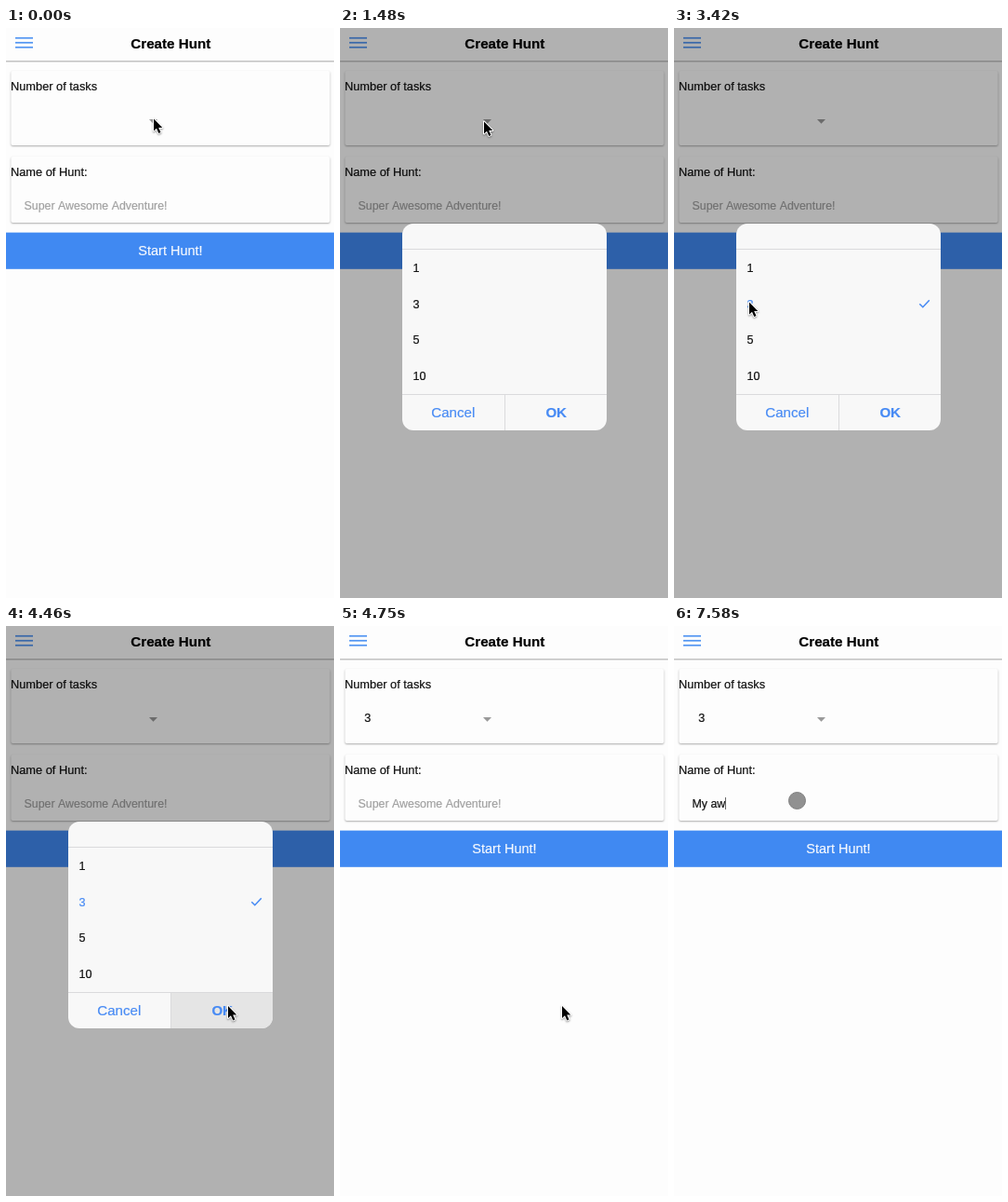
Write an HTML page with a canvas that moves like this. It is 353 by 612 pixels and loops after 8 s.

```html
<!DOCTYPE html>
<html lang="en">
<head>
<meta charset="utf-8">
<title>Create Hunt</title>
<style>
  html, body { margin: 0; width: 100%; height: 100%; overflow: hidden; background: #fdfdfd; }
  canvas { display: block; width: 353px; height: 612px; }
</style>
</head>
<body>
<canvas id="stage" width="353" height="612"></canvas>
<script>
const W = 353, H = 612, LOOP = 8000;
const STEP = 148.4; // the screen refreshes once per step
const stage = document.getElementById('stage').getContext('2d');
const layer = Object.assign(document.createElement('canvas'), { width: W, height: H });
const sheet = layer.getContext('2d');

const PAGE = '#fdfdfd', INK = '#111', BLUE = '#4089f2', LINK = '#488bf4', RULE = '#dadadc';

// All moments below are counted in steps.
const OPEN = { start: 8.85, length: 1 };
const CLOSE = { start: 30.23, length: 1.3 };
const PICK = 23, PRESS = 30, FOCUS = 39, BLINK = 42, TYPE = 44, TOUCH = 45;
const ENTRY = 'My aw', KEYS_PER_STEP = 3 / 5;

const MOVES = [
  { start: 0, length: 1, x: 155, y: 101 },
  { start: 11, length: 6, x: 81, y: 295 },
  { start: 24, length: 5, x: 239, y: 408.5 },
  { start: 33, length: 3, x: 132.3, y: 187.3 }
];

const mix = (a, b, p) => a + (b - a) * p;
const ease = x => {
  x = Math.min(1, Math.max(0, x));
  return x * x * (3 - 2 * x);
};
const progress = (span, k) => ease((k - span.start) / span.length);

function text(c, str, x, y, size, color, align = 'left', weight = 'normal') {
  c.font = `${weight} ${size}px "Liberation Sans", Arial, sans-serif`;
  c.textAlign = align;
  c.fillStyle = c.strokeStyle = color;
  c.fillText(str, x, y);
  c.lineWidth = 0.2;
  c.strokeText(str, x, y);
}

function rect(c, x, y, w, h, color) {
  c.fillStyle = color;
  c.fillRect(x, y, w, h);
}

function path(c, points) {
  c.beginPath();
  points.forEach(([x, y]) => c.lineTo(x, y));
}

function roundRect(c, x, y, w, h, r) {
  c.beginPath();
  c.roundRect(x, y, w, h, r);
}

function card(c, y, h) {
  c.save();
  c.shadowColor = 'rgba(0,0,0,.32)';
  c.shadowBlur = 2;
  c.shadowOffsetY = 1;
  c.fillStyle = PAGE;
  roundRect(c, 5.3, y, 343.4, h, 2);
  c.fill();
  c.restore();
}

function header(c) {
  rect(c, 0, 35, W, 1.5, '#c2c2c2');
  for (let i = 0; i < 3; i++) rect(c, 10, 9.9 + i * 5, 19, 1.7, '#5094f2');
  text(c, 'Create Hunt', 177.3, 22, 15.2, '#000', 'center', 'bold');
}

function nameField(c, k) {
  const count = k < TYPE ? 0 : 1 + Math.floor((k - TYPE) * KEYS_PER_STEP);
  const value = ENTRY.slice(0, count);
  text(c, value || 'Super Awesome Adventure!', 19.5, 195, 12.4, value ? INK : '#a0a0a0');
  if (value || (k >= FOCUS && k < BLINK)) {
    const x = value ? 19.5 + c.measureText(value).width : 19.5;
    rect(c, Math.round(x), 184, 1, 13, '#666');
  }
}

function form(c, k) {
  rect(c, 0, 0, W, H, PAGE);
  header(c);
  card(c, 46, 80);
  text(c, 'Number of tasks', 5, 67.1, 12.8, INK);
  if (k > PRESS) text(c, '3', 26.3, 103.2, 12.6, INK);
  path(c, [[154, 98], [163, 98], [158.5, 102.8]]);
  c.fillStyle = '#999';
  c.fill();
  card(c, 138, 71);
  text(c, 'Name of Hunt:', 5, 159.1, 12.8, INK);
  nameField(c, k);
  rect(c, 0, 219.6, W, 39.2, BLUE);
  text(c, 'Start Hunt!', 177, 244.1, 14.5, '#f4f8fe', 'center');
}

function dialog(c, scale, k) {
  c.clearRect(0, 0, W, H);
  c.save();
  c.translate(177, 321);
  c.scale(scale, scale);
  c.translate(-177, -321);
  roundRect(c, 67, 210, 220, 222, 12);
  c.clip();
  rect(c, 67, 210, 220, 222, '#f8f8f8');
  if (k >= PRESS) rect(c, 178, 394, 109, 38, '#e5e5e5');
  rect(c, 67, 237, 220, 1, RULE);
  rect(c, 67, 393, 220, 1, RULE);
  rect(c, 177, 394, 1, 38, RULE);
  const picked = k >= PICK;
  ['1', '3', '5', '10'].forEach((label, i) => {
    const color = picked && i === 1 ? LINK : INK;
    text(c, label, 78.5, 262.1 + i * 38.6, 12.6, color);
  });
  if (picked) {
    path(c, [[264.3, 296.3], [267.8, 299.7], [274.8, 292.3]]);
    c.strokeStyle = LINK;
    c.lineWidth = 1.6;
    c.stroke();
  }
  text(c, 'Cancel', 121.8, 418.2, 15.1, LINK, 'center');
  text(c, 'OK', 232.7, 418.2, 15.1, LINK, 'center', 'bold');
  c.restore();
}

function overlay(c, k) {
  const enter = progress(OPEN, k), leave = progress(CLOSE, k);
  if (!enter || leave === 1) return;
  const shown = enter * (1 - leave);
  const scale = leave ? mix(1, 0.9, leave) : mix(1.1, 1, enter);
  // The first repaint reaches only the bottom edge of the dialog.
  rect(c, 0, 0, W, enter < 0.5 ? 441 : H, `rgba(0,0,0,${mix(0.005, 0.3, shown)})`);
  dialog(sheet, scale, k);
  c.globalAlpha = shown;
  c.drawImage(layer, 0, 0);
  c.globalAlpha = 1;
}

function pointerAt(k) {
  let x = 159, y = 98;
  for (const move of MOVES) {
    const p = progress(move, k);
    x = mix(x, move.x, p);
    y = mix(y, move.y, p);
  }
  return [x, y];
}

function arrow(c, x, y) {
  c.save();
  c.translate(x, y - 0.5);
  path(c, [[0, 0], [0, 13], [3, 10.2], [5.3, 15.4], [7.5, 14.4], [5.2, 9.5], [9.3, 9.5]]);
  c.closePath();
  c.lineJoin = 'round';
  c.lineWidth = 2;
  c.strokeStyle = '#fff';
  c.shadowColor = 'rgba(0,0,0,.4)';
  c.shadowBlur = 2;
  c.shadowOffsetY = 1;
  c.stroke();
  c.shadowColor = 'transparent';
  c.fillStyle = '#000';
  c.fill();
  c.restore();
}

function pointer(c, k) {
  if (k < TOUCH) return arrow(c, ...pointerAt(k));
  c.beginPath();
  c.arc(132.5, 187.5, 9, 0, 2 * Math.PI);
  c.fillStyle = '#919191';
  c.fill();
  c.lineWidth = 1;
  c.strokeStyle = '#808080';
  c.stroke();
}

function draw(time) {
  const k = Math.floor((time % LOOP + 7) / STEP);
  form(stage, k);
  overlay(stage, k);
  pointer(stage, k);
}

const origin = performance.now();
function loop() {
  draw(performance.now() - origin);
  requestAnimationFrame(loop);
}
loop();
</script>
</body>
</html>
```
